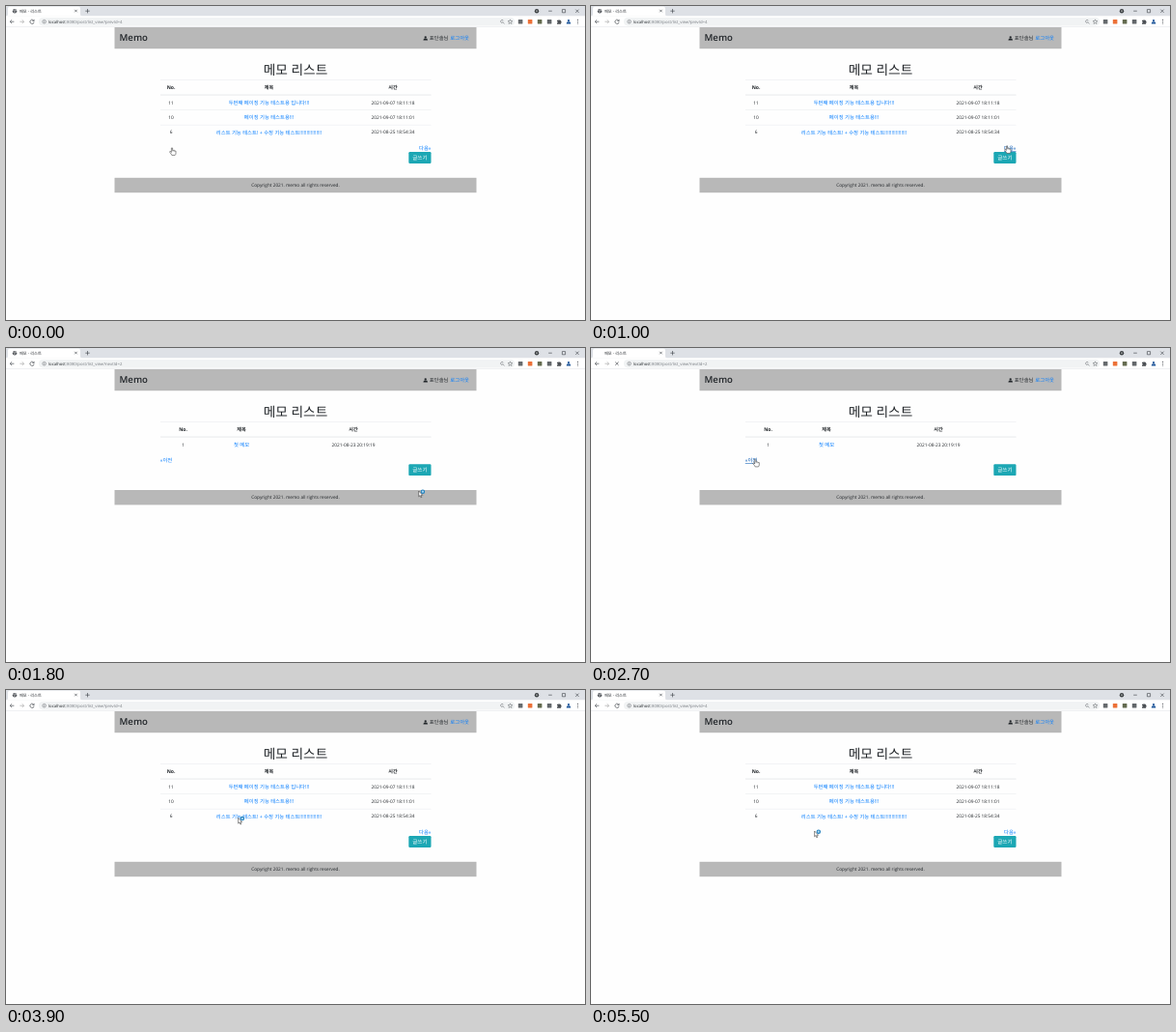
Recreate the animation shown at these times as an HTML page. Size 600 by 325 pixels, loop 5.6 s.

```html
<!DOCTYPE html>
<html lang="en">
<head>
<meta charset="utf-8">
<title>Memo list</title>
<style>
html, body { margin: 0; width: 100%; height: 100%; overflow: hidden; background: #fefefe; }
svg { display: block; width: 100vw; height: 100vh; }
text {
  font-family: "Open Sans", "Noto Sans CJK KR", "Noto Sans CJK", sans-serif;
  fill: #212529;
  text-rendering: geometricPrecision;
}
.link { fill: #007bff; }
.hover { fill: #0056b3; text-decoration: underline; }
.line { fill: none; stroke: #4d5156; stroke-width: .7; }
.cursor { fill: #fff; stroke: #222; stroke-width: .5; stroke-linejoin: round; }
</style>
</head>
<body>
<svg id="stage" viewBox="0 0 600 325" preserveAspectRatio="none"></svg>
<script>
const LOOP = 5600, STEP = 100;
const LATIN = 4.75, HANGUL = 5.35;

const pages = {
  newest: {
    columns: [171, 272.5, 401], next: true,
    rows: [
      ['11', '두번째 페이징 기능 테스트용 입니다!!!', '2021-09-07 18:11:18'],
      ['10', '페이징 기능 테스트용!!!', '2021-09-07 18:11:01'],
      ['6', '리스트 기능 테스트! + 수정 기능 테스트' + '!'.repeat(16), '2021-08-25 18:54:34']
    ]
  },
  middle: {
    columns: [177, 259, 382], next: true, prev: true,
    rows: [
      ['4', '안녕하세요.', '2021-08-24 18:37:13'],
      ['3', '메모 입력 기능 테스트!', '2021-08-24 03:26:44'],
      ['2', '사진 올리기 테스트', '2021-08-23 20:34:12']
    ]
  },
  oldest: {
    columns: [183.5, 244, 360], prev: true,
    rows: [['1', '첫 메모', '2021-08-23 20:19:19']]
  }
};

// [start time, page, query]
const visits = [
  [0, 'newest', 'prevId=4'],
  [1100, 'middle', 'nextId=6'],
  [1800, 'oldest', 'nextId=2'],
  [2800, 'middle', 'prevId=1'],
  [3600, 'newest', 'prevId=4']
];

// [time, x, y] of the pointer tip
const path = [
  [0, 172, 146.5], [300, 275, 101], [500, 405, 126], [700, 431, 144.5],
  [1700, 431, 144.5], [1800, 427.7, 148], [2200, 300, 137], [2500, 174, 117],
  [2600, 170.3, 115], [2900, 170.3, 115], [3100, 168, 140], [3200, 167.5, 144.5],
  [3700, 167.5, 144.5], [4300, 387, 108], [4450, 395, 90], [4600, 365.3, 93.5],
  [4900, 193, 150], [5200, 335, 36], [5500, 231.6, 146]
];

const within = (t, from, to) => t >= from && t < to;

// Text centred vertically on y
function label(x, y, content, { size = HANGUL, anchor = 'middle', cls = '', extra = '' } = {}) {
  return `<text x="${x}" y="${y + size * .37}" font-size="${size}" text-anchor="${anchor}" class="${cls}" ${extra}>${content}</text>`;
}

const rect = (x, y, w, h, fill, r = 0) =>
  `<rect x="${x}" y="${y}" width="${w}" height="${h}" rx="${r}" fill="${fill}"/>`;

const icon = (d, extra = '') => `<path class="line" d="${d}" ${extra}/>`;

function person(x, y, color) {
  return `<g fill="${color}"><circle cx="${x}" cy="${y - 1.1}" r="1.15"/>
    <path d="M${x - 2.2} ${y + 2.2}v-.7q0-1.4 2.2-1.4t2.2 1.4v.7z"/></g>`;
}

function browser() {
  return rect(0, 0, 600, 10.5, '#dee1e6') + rect(0, 10.5, 600, 11, '#fff') +
    '<path d="M0 10.5q2 0 2-2v-6q0-1.7 1.7-1.7h71.6q1.7 0 1.7 1.7v6q0 2 2 2z" fill="#fff"/>' +
    label(14, 5.2, '메모 - 리스트', { size: 4.2, anchor: 'start' }) +
    icon('M71.2 3.8l2.5 2.5m0-2.5l-2.5 2.5M84.5 3v4.4m-2.2-2.2h4.4') +
    '<circle cx="550" cy="5.2" r="2.2" fill="#3c4043"/><path d="M549 4.7h2l-1 1.3z" fill="#fff"/>' +
    icon('M562.2 5.2h3.6M576.4 3.6h3.2v3.2h-3.2zM590.3 3.6l3.3 3.3m0-3.3l-3.3 3.3', 'stroke-width=".5"') +
    icon('M8.4 16.2H4.2m1.9-1.9l-1.9 1.9l1.9 1.9') +
    icon('M14.4 16.2h4.2m-1.9-1.9l1.9 1.9l-1.9 1.9', 'style="stroke:#aaa"') +
    rect(34, 12.1, 493, 8.3, '#f1f3f4', 4.1) +
    '<g stroke-width=".5" fill="none" stroke="#5f6368"><circle cx="39.6" cy="16.2" r="1.8"/><path d="M39.6 15.9v1.3m0-2.2v.4"/></g>' +
    icon('M515.5 15.3a1.5 1.5 0 1 0-1 2.1m-.2-1.2l2.2 2.1', 'style="stroke-width:.5"') +
    icon('M522.5 13.9l.7 1.6 1.7.1-1.3 1.1.4 1.7-1.5-.9-1.5.9.4-1.7-1.3-1.1 1.7-.1z', 'style="stroke-width:.45"') +
    ['#666a6d', '#ec7138', '#646b50', '#63676b'].map((c, i) => rect(530.8 + i * 10, 13.9, 4.6, 4.6, c, .5)).join('') +
    '<path d="M571 14.8h1.2a.9.9 0 0 1 1.7 0h1.2v1.2a.9.9 0 0 1 0 1.7v1H571v-1.2a.8.8 0 0 0 0-1.6z" fill="#4d5156"/>' +
    person(583, 16.2, '#245a9c') +
    [14.4, 16.2, 18].map(y => `<circle cx="592.6" cy="${y}" r=".55" fill="#4d5156"/>`).join('') +
    rect(0, 21.4, 600, .4, '#dadce0') +
    `<g id="globe"><circle cx="9" cy="5.2" r="2.2" fill="#4d5156"/>
      <path d="M7.2 4.5l1.5.4.6 1-.8 1M9.2 3.3l.3 1.1 1.3.2" fill="none" stroke="#fff" stroke-width=".55"/></g>` +
    `<g id="reload">${icon('M28.6 14.9a2.1 2.1 0 1 0 .5 1.7M29.1 13.9v1.6h-1.7')}</g>` +
    `<g id="stop">${icon('M25.2 14.5l3.4 3.4m0-3.4l-3.4 3.4')}</g>` +
    label(44, 16.1, 'localhost<tspan fill="#757a7f">:8080/post/list_view?<tspan id="query"></tspan></tspan>',
      { size: 4.28, anchor: 'start' });
}

function siteHeader() {
  return rect(112.5, 22, 375, 22.2, '#b8b8b8') +
    label(117.5, 32.6, 'Memo', { size: 9.6, anchor: 'start', extra: 'font-weight="600"' }) +
    person(434.7, 33.4, '#212529') +
    label(438.8, 33.2, '표단솔님', { anchor: 'start' }) +
    label(480, 33.2, '로그아웃', { anchor: 'end', cls: 'link' }) +
    label(300, 66.3, '메모 리스트', { size: 13.7 });
}

function pageBody(name) {
  const { columns, rows, prev, next } = pages[name];
  const pagerY = 101 + rows.length * 15.4;
  const bold = { size: 5.1, extra: 'font-weight="700"' };
  let out = ['No.', '제목', '시간'].map((h, i) => label(columns[i], 84.5, h, bold)).join('');
  out += rect(160, 76.2, 280.5, .4, '#dee2e6') + rect(160, 91.7, 280.5, .65, '#d9dde1');
  rows.forEach(([id, title, date], i) => {
    const y = 100 + i * 15.35;
    if (i) out += rect(160, y - 7.8, 280.5, .4, '#dee2e6');
    out += label(columns[0], y, id, { size: LATIN }) +
      label(columns[1], y, title, { cls: 'link' }) +
      label(columns[2], y, date, { size: LATIN });
  });
  if (prev) out += label(159.8, pagerY, '«이전', { anchor: 'start', cls: 'link prev' });
  if (next) out += label(440.5, pagerY, '다음»', { anchor: 'end', cls: 'link next' });
  out += rect(417.3, pagerY + 3.8, 23.2, 11.9, '#1ca7b4', 1.2) +
    label(428.9, pagerY + 9.7, '글쓰기', { size: 5.6, extra: 'style="fill:#fff"' }) +
    rect(112.5, pagerY + 30.6, 375, 15.4, '#b8b8b8') +
    label(300, pagerY + 38.2, 'Copyright 2021. memo all rights reserved.', { size: 4.72 });
  return `<g id="${name}">${out}</g>`;
}

const hand = `<g id="hand"><path class="cursor" d="M-.6.5q.6-1 1.2 0v2.6l.5-.4.8.5.6-.3.7.6.8.1v2.2q0 1.3-.8 2.1h-3.4q-.5-1.3-2.2-3.3q0-1 1-.5l.8.8z"/>
  <path d="M1.1 3.2v1m1.4-.8v1" stroke="#222" stroke-width=".3"/></g>`;
const busy = `<g id="busy"><path class="cursor" d="M0 0v5.8l1.3-1.2.9 2.2.9-.4-.9-2.1h1.8z"/>
  <circle cx="4.2" cy=".7" r="1.7" fill="#a9d8f2" stroke="#2481bd" stroke-width="1.1"/></g>`;

const stage = document.getElementById('stage');
stage.innerHTML = rect(0, 0, 600, 325, '#fefefe') + browser() + siteHeader() +
  Object.keys(pages).map(pageBody).join('') + `<g id="pointer">${hand}${busy}</g>`;

const find = id => document.getElementById(id);
const show = (id, on) => { find(id).style.display = on ? '' : 'none'; };
const hover = (cls, on) => stage.querySelectorAll('.' + cls).forEach(el => el.classList.toggle('hover', on));

function pointerAt(t) {
  const i = path.findIndex(key => key[0] > t);
  if (i < 0) return path[path.length - 1].slice(1);
  const [t0, x0, y0] = path[i - 1], [t1, x1, y1] = path[i];
  const k = (t - t0) / (t1 - t0);
  return [x0 + (x1 - x0) * k, y0 + (y1 - y0) * k];
}

function draw(now) {
  const t = Math.floor(now % LOOP / STEP) * STEP;
  const [, page, query] = visits.filter(v => v[0] <= t).pop();
  Object.keys(pages).forEach(name => show(name, name === page));
  find('query').textContent = query;

  const loading = within(t, 2600, 2800) || within(t, 3400, 3600);
  show('globe', !loading);
  show('reload', !loading);
  show('stop', loading);

  hover('next', within(t, 600, 1800));
  hover('prev', within(t, 2500, 2900) || within(t, 3100, 3600));

  const isHand = t < 100 || within(t, 600, 1800) || within(t, 2500, 3800);
  show('hand', isHand);
  show('busy', !isHand);
  find('pointer').setAttribute('transform', `translate(${pointerAt(t)})`);
  requestAnimationFrame(draw);
}
draw(performance.now());
</script>
</body>
</html>
```
